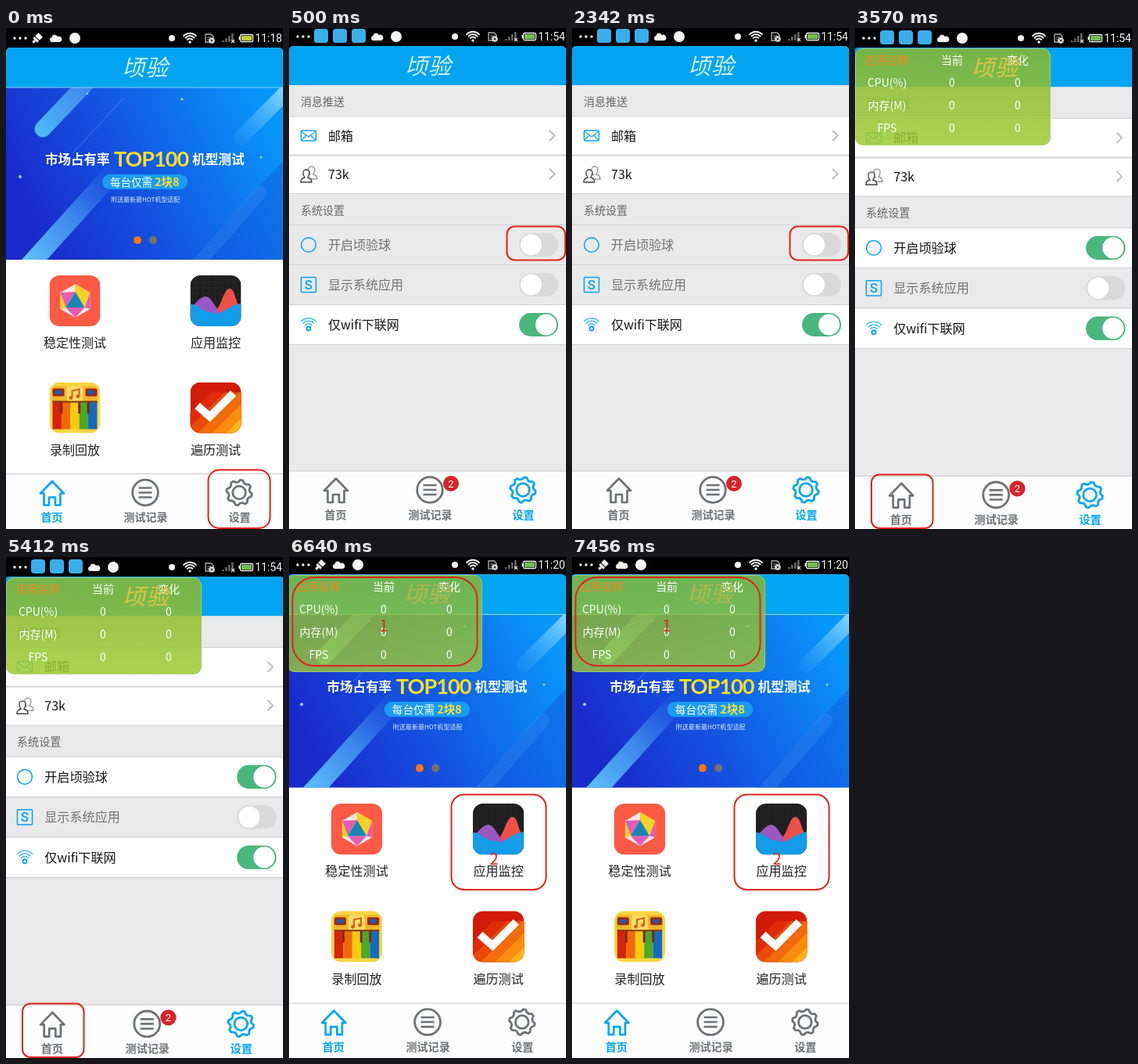
These frames come from a looping animation (354 by 640 pixels, 8 s). An HTML page:

```html
<!DOCTYPE html>
<html lang="zh">
<head>
<meta charset="utf-8">
<title>App walkthrough</title>
<style>
  html, body { margin: 0; width: 100%; height: 100%; overflow: hidden; background: #000; }
  svg { display: block; width: 100vw; height: 100vh; }
  text { font-family: "Noto Sans CJK SC", "Noto Sans CJK", "Noto Sans", sans-serif; }
  .latin { font-family: Roboto, sans-serif; }
  .title { font-weight: 300; font-style: italic; letter-spacing: 1px; }
</style>
</head>
<body>
<svg id="stage" viewBox="0 0 354 640" preserveAspectRatio="none">
  <defs>
    <linearGradient id="banner" gradientUnits="userSpaceOnUse" x1="30" y1="240" x2="330" y2="90">
      <stop offset="0" stop-color="#1a2acb"/><stop offset=".45" stop-color="#1356e2"/><stop offset="1" stop-color="#0898fb"/>
    </linearGradient>
    <linearGradient id="beam" gradientUnits="userSpaceOnUse" x1="40" y1="135" x2="115" y2="70">
      <stop offset="0" stop-color="#4cbcfc"/><stop offset="1" stop-color="#5aa8f6" stop-opacity=".6"/>
    </linearGradient>
    <linearGradient id="beamLow" gradientUnits="userSpaceOnUse" x1="25" y1="296" x2="145" y2="180">
      <stop offset="0" stop-color="#5cc0fb"/><stop offset=".5" stop-color="#48a0f4" stop-opacity=".75"/>
      <stop offset="1" stop-color="#2a7cee" stop-opacity="0"/>
    </linearGradient>
    <linearGradient id="beamRight" gradientUnits="userSpaceOnUse" x1="296" y1="140" x2="354" y2="80">
      <stop offset="0" stop-color="#4cb4fc" stop-opacity=".15"/><stop offset="1" stop-color="#9adcff" stop-opacity=".85"/>
    </linearGradient>
    <linearGradient id="panel" x1="0" y1="0" x2="0" y2="1">
      <stop offset="0" stop-color="#88b62c"/><stop offset="1" stop-color="#9dcb35"/>
    </linearGradient>
    <clipPath id="bannerClip"><rect y="76" width="354" height="220"/></clipPath>
    <clipPath id="tileClip"><rect width="65" height="65" rx="13"/></clipPath>
  </defs>
</svg>
<script>
const LOOP = 8000;
const BLUE = '#03a5f3', GREY = '#707276', RED = '#e2231f', APP = '顷验';
const YELLOW_CELL = '#c4cf38', GREEN_CELL = '#6fc04a';

const text = (x, y, s, size, fill, o = '') =>
  `<text x="${x}" y="${y}" font-size="${size}" fill="${fill}" ${o}>${s}</text>`;
const mid = (x, y, s, size, fill, o = '') => text(x, y, s, size, fill, 'text-anchor="middle" ' + o);
const rect = (x, y, w, h, fill, rx = 0, o = '') =>
  `<rect x="${x}" y="${y}" width="${w}" height="${h}" fill="${fill}" rx="${rx}" ${o}/>`;
const circle = (x, y, r, fill, o = '') => `<circle cx="${x}" cy="${y}" r="${r}" fill="${fill}" ${o}/>`;
const line = (d, color, w = 1, o = '') =>
  `<path d="${d}" fill="none" stroke="${color}" stroke-width="${w}" ${o}/>`;
const shape = (d, fill, o = '') => `<path d="${d}" fill="${fill}" ${o}/>`;
const group = (transform, body) => `<g transform="${transform}">${body}</g>`;
const at = (x, y, body) => group(`translate(${x} ${y})`, body);
const mark = (x, y, w, h, rx) => rect(x, y, w, h, 'none', rx, `stroke="${RED}" stroke-width="2"`);

function fan(radii, color, w) {
  return radii.map(r => {
    const k = r * .72;
    return line(`M${-k} ${-k}A${r} ${r} 0 0 1 ${k} ${-k}`, color, w, 'stroke-linecap="round"');
  }).join('');
}

function statusBar(y, clock, apps, cell) {
  const white = '#f4f4f4';
  const cloud = x => at(x, y, circle(-2, -1, 3.5, '#e9c98d') +
    shape('M-5 5a3 3 0 0 1 0-6 4 4 0 0 1 7-1 3.6 3.6 0 0 1 3 7z', white));
  let out = [11, 18, 25].map(x => circle(x, y, 1.7, white)).join('');
  if (apps) {
    out += [41, 65, 89].map(x => rect(x - 9, y - 10, 18, 18, '#3aaeea', 4)).join('');
    out += cloud(113) + circle(137, y, 7, white);
  } else {
    out += at(40, y, group('rotate(45)', rect(-4, -6, 8, 6, white, 1) + rect(-4, 1, 8, 3, white) + rect(-1.5, 4, 3, 4, white)));
    out += cloud(64) + circle(88, y, 7, white);
  }
  out += circle(212, y, 4, white);
  out += at(235, y + 5, circle(0, 0, 1.7, white) + fan([4.5, 7.7, 11], white, 2));
  out += at(260, y, line('M-5-5H2L5-2V5H-5Z', '#aaa', 1.4) + line('M-3-1H2M-3 2H1', '#aaa') +
    circle(3, 3, 3.8, '#ddd') + line('M1.5 1.5l3 3m0-3l-3 3', '#222', 1));
  out += at(284, y, [0, 1, 2, 3].map(i => rect(-8 + i * 4, 3 - i * 3, 2.6, 2 + i * 3, '#666')).join('') +
    line('M4 2l4 4m0-4l-4 4', '#ddd', 1.2));
  out += at(307, y, rect(-7.5, -4.5, 16, 9, 'none', 1.5, `stroke="${white}" stroke-width="1.3"`) +
    rect(-9.5, -2, 2, 4, white) + rect(-6, -3, 13, 6, cell));
  return out + text(353, y + 5, clock, 14, white, 'class="latin" text-anchor="end"');
}

const title = (x, y, color) => mid(x, y, APP, 29, color, 'class="title"');
const header = (y, h) => shape(`M0 ${y + h}V${y + 6}q0-6 6-6H348q6 0 6 6V${y + h}z`, BLUE) +
  title(178, y + 36, '#d8f0fe');

function gear(x, y, color) {
  const pts = [];
  for (let i = 0; i < 32; i++) {
    const a = (i + .5) * Math.PI / 16, r = i % 4 < 2 ? 16.3 : 13.6;
    pts.push((r * Math.cos(a)).toFixed(1) + ' ' + (r * Math.sin(a)).toFixed(1));
  }
  return at(x, y, line('M' + pts.join('L') + 'Z', color, 2.8, 'stroke-linejoin="round"') +
    circle(0, 0, 8.3, 'none', `stroke="${color}" stroke-width="2.8"`));
}

function tabs(top, xs, active, badge) {
  const color = i => i === active ? BLUE : GREY;
  const y = top + 24, [a, b, c] = xs;
  let out = rect(0, top, 354, 80, '#fdfdfd') + line(`M0 ${top}H354`, '#c9c9c9');
  out += at(a, y, line('M-15 1L0-14.5 15 1H10.5V16H4V6H-4V16H-10.5V1Z', color(0), 2.7, 'stroke-linejoin="round"'));
  out += at(b, y, circle(0, 0, 16.3, 'none', `stroke="${color(1)}" stroke-width="2.8"`) +
    line('M-8.5-6H8.5M-8.5 0H8.5M-8.5 6H8.5', color(1), 2.6));
  out += gear(c, y, color(2));
  ['首页', '测试记录', '设置'].forEach((s, i) => {
    out += mid(xs[i] + (i ? .5 : -.5), top + 60.5, s, 14, color(i), 'font-weight="700"');
  });
  if (badge) out += circle(207, top + 16, 10, '#d8232a') + mid(207, top + 20.5, badge, 13, '#fff', 'class="latin"');
  return out;
}

function banner() {
  const beam = (d, stroke, w, o = '') => line(d, stroke, w, 'stroke-linecap="round" ' + o);
  return `<g clip-path="url(#bannerClip)">` + rect(0, 76, 354, 220, 'url(#banner)') +
    shape('M236 296L354 170V296Z', '#1348d8', 'opacity=".35"') +
    beam('M47 129L125 47', 'url(#beam)', 21) +
    beam('M18 316L140 181', 'url(#beamLow)', 24) +
    beam('M300 140L372 68', 'url(#beamRight)', 19) +
    beam('M236 312L325 210', '#3490f2', 17, 'opacity=".35"') +
    beam('M85 160L150 90', '#4a8cf5', 2, 'opacity=".3"') +
    [[225, 91, 1.7], [18, 190, 2], [326, 165, 1.5], [104, 84, 1.3]].map(p => circle(...p, '#8fd4ff')).join('') +
    text(50, 174, '市场占有率', 16.5, '#fff', 'font-weight="700"') +
    text(138, 176.5, 'TOP100', 27, '#ffde28', 'style="font-family:Lato,sans-serif;letter-spacing:-1px" font-weight="700"') +
    text(238, 174, '机型测试', 16.7, '#fff', 'font-weight="700"') +
    rect(123, 187, 109, 19, '#1a9cf2', 9.5) +
    text(133, 201.5, '每台仅需', 13.5, '#fff') +
    text(190, 202, '2块8', 14.5, '#ffe030', 'font-weight="700"') +
    text(134, 222, '附送最新最HOT机型适配', 8, '#e3edff') +
    circle(168, 271, 5, '#f7780c') + circle(188, 271, 5, '#77706f') + '</g>';
}

const tile = (x, y, body) => at(x, y, `<g clip-path="url(#tileClip)">${body}</g>`);

function gemTile() {
  return rect(0, 0, 65, 65, '#fd5a46') +
    shape('M33 11L52 22V43L33 54 14 43V22Z', '#f6e6e2') +
    shape('M33 11L52 22 33 21Z', '#f4d21f') + shape('M33 21L52 22 45 41Z', '#f4d21f') +
    shape('M14 22L33 21 21 41Z', '#e45cb4') + shape('M14 22L21 41 14 43Z', '#f4d21f') +
    shape('M52 22L45 41 52 43Z', '#e45cb4') + shape('M21 41H45L33 54Z', '#e45cb4') +
    shape('M33 21L45 41H21Z', '#1686b4');
}

function chartTile() {
  let grid = '';
  for (let i = 8; i < 65; i += 8) grid += `M${i} 0V65M0 ${i}H65`;
  return rect(0, 0, 65, 65, '#1f1f20') + line(grid, '#2c2c2e', .6) +
    shape('M28 48C40 44 42 17 50 17S57 36 65 41V65H28Z', '#ee5049') +
    shape('M0 42C8 36 11 28 19 27S31 42 42 50V65H0Z', '#9a58c0') +
    shape('M0 37C10 36 14 46 24 47S33 51 40 47 56 37 65 36V65H0Z', '#149ce8');
}

function pianoTile() {
  const colors = ['#d8220f', '#f0680c', '#f9c90e', '#4ea92a', '#1668c2'];
  const pad = x => rect(x, 8, 15, 10, '#9c2a14', 2) + rect(x + 3, 10.5, 9, 5, '#2a58a8', 1);
  return rect(0, 0, 65, 65, '#f8d640') + rect(3, 5, 59, 22, '#eeb62c', 5) + pad(4) + pad(46) +
    rect(22, 5, 21, 20, '#fbdc62', 4) +
    line('M29 20V11L38 9V18', '#d2611a', 2) + circle(27.5, 20, 2.4, '#d2611a') + circle(36.5, 18, 2.4, '#d2611a') +
    colors.map((c, i) => rect(4 + i * 11.4, 24, 11.4, 36, c)).join('') +
    line('M4 25H61', '#8a3a12', 2) + line('M15.4 25V40M38.2 25V40M49.6 25V40', '#7a2a10', 3);
}

function checkTile() {
  const colors = ['#e02a08', '#ea4a08', '#f36b0a', '#f98d10', '#fdb21c'];
  return rect(0, 0, 65, 65, '#d21c0a') +
    colors.map((c, i) => shape(`M${-26 + i * 18} 65L${26 + i * 18} 13H130V65Z`, c)).join('') +
    line('M9 30L25 44 55 14', '#fff', 10);
}

function home() {
  const label = (x, y, s) => mid(x, y, s, 16, '#222');
  return rect(0, 25, 354, 620, '#fff', 6) + header(25, 51) + banner() + line('M0 76H354', '#9fdcfa', .8) +
    tile(55.5, 316, gemTile()) + label(88, 408, '稳定性测试') +
    tile(235.5, 316, chartTile()) + label(268, 408, '应用监控') +
    tile(55.5, 452.5, pianoTile()) + label(88, 544.5, '录制回放') +
    tile(235.5, 452.5, checkTile()) + label(268, 544.5, '遍历测试') +
    tabs(569.5, [59, 178, 298], 0);
}

const toggle = (y, on) => rect(294, y - 15, 50, 30, on ? '#4ab77d' : '#d9d9d9', 15) +
  circle(on ? 328.5 : 309.5, y, 13.5, '#fff');
const chevron = y => line(`M333 ${y - 6}l6.5 6.5-6.5 6.5`, '#bbb', 1.8);

function settings(ball) {
  const dark = '#151515', dim = '#737373';
  const row = (y, h, on) => (on ? rect(0, y, 354, h, '#fff') : '') + line(`M0 ${y}H354M0 ${y + h}H354`, '#d0d0d0');
  const person = (x, y, c) => at(x, y, shape('M-7 8q0-5 5-6Q-4-1-4-4a4 4 0 0 1 8 0q0 3-2 6 5 1 5 6z', '#fff',
    `stroke="${c}" stroke-width="1.4"`));
  return rect(0, 23, 354, 625, '#e9e9e9', 6) + header(23, 50) +
    text(15, 99, '消息推送', 14, '#666') +
    row(113, 49, true) + row(163, 48.5, true) +
    text(15, 237.5, '系统设置', 14, '#666') +
    row(251.5, 51, ball) + row(302.5, 51, false) + row(353.5, 51, true) +
    rect(15.5, 131, 19, 13, 'none', 1.5, `stroke="${BLUE}" stroke-width="1.4"`) +
    line('M16 132L25 139 34 132M16 143L22 137.5M34 143L28 137.5', BLUE, 1.1) +
    text(50, 143.5, '邮箱', 16, dark) + chevron(137) +
    person(29, 185, '#999') + person(22, 189, '#444') +
    text(50, 193, '73k', 16, dark) + chevron(186) +
    circle(25, 277, 9.3, 'none', `stroke="${BLUE}" stroke-width="1.5"`) +
    text(50, 283, `开启${APP}球`, 16, ball ? dark : dim) + toggle(277, ball) +
    rect(15.5, 318.5, 19, 19, 'none', 1, `stroke="${BLUE}" stroke-width="1.5"`) +
    mid(25, 334, 'S', 17, BLUE, 'class="latin" font-weight="500"') +
    text(50, 334, '显示系统应用', 16, dim) + toggle(328, false) +
    at(25, 384, fan([6, 9.5, 13], '#45c3ea', 1.5) + circle(0, 0, 2.5, 'none', `stroke="${BLUE}" stroke-width="1.8"`)) +
    text(50, 385, '仅wifi下联网', 16, dark) + toggle(379, true) +
    tabs(566, [60, 180, 299], 2, '2');
}

function monitor(x, y, alpha) {
  const cell = (cx, cy, s, fill = '#fff') => mid(cx, cy, s, 14, fill);
  let out = rect(0, 0, 250, 124, 'url(#panel)', 10, `opacity="${alpha}"`) +
    rect(.5, .5, 249, 123, 'none', 10, 'stroke="#b9d77a" opacity=".6"') +
    cell(41, 20, '应用名称', '#f08a1c') + cell(124, 19.5, '当前') + cell(208, 19.5, '变化');
  ['CPU(%)', '内存(M)', 'FPS'].forEach((s, i) => {
    const cy = 48.5 + i * 29.3;
    out += cell(41, cy, s) + cell(124, cy, '0') + cell(208, cy, '0');
  });
  return at(x, y, out);
}

const scenes = [
  [0, home() + statusBar(13, '11:18', false, YELLOW_CELL) + mark(258.5, 564.5, 79, 74.5, 14)],
  [500, settings(false) + statusBar(11, '11:54', true, GREEN_CELL) + mark(278.5, 253.5, 74.5, 43, 10)],
  [3570, group('translate(-1.2 1.7) scale(1.008)', settings(true)) + statusBar(13, '11:54', true, GREEN_CELL) +
    monitor(0, 26, .86) + title(179, 61, '#d9c445') + mark(21, 570.5, 78.5, 68.5, 10)],
  [6640, group('translate(-2 -3) scale(1.006)', home()) + statusBar(10, '11:20', false, GREEN_CELL) +
    monitor(-3, 23, .8) + title(176, 58, '#a4b44c') +
    mark(4.5, 26, 236, 113, 28) + mark(207.5, 303.5, 121, 121.5, 16) +
    mid(121, 95, '1', 20, RED) + mid(262, 393, '2', 20, RED)]
];

const stage = document.getElementById('stage');
stage.insertAdjacentHTML('beforeend', scenes.map(s =>
  `<g class="scene" visibility="hidden">${rect(0, 0, 354, 640, '#000')}${s[1]}</g>`).join(''));
const layers = [...stage.querySelectorAll('.scene')];

const start = performance.now();
function draw(now) {
  const t = Math.max(0, now - start) % LOOP;
  const current = scenes.reduce((k, s, i) => t >= s[0] ? i : k, 0);
  layers.forEach((g, i) => g.setAttribute('visibility', i === current ? 'visible' : 'hidden'));
  requestAnimationFrame(draw);
}
draw(start);
</script>
</body>
</html>
```
